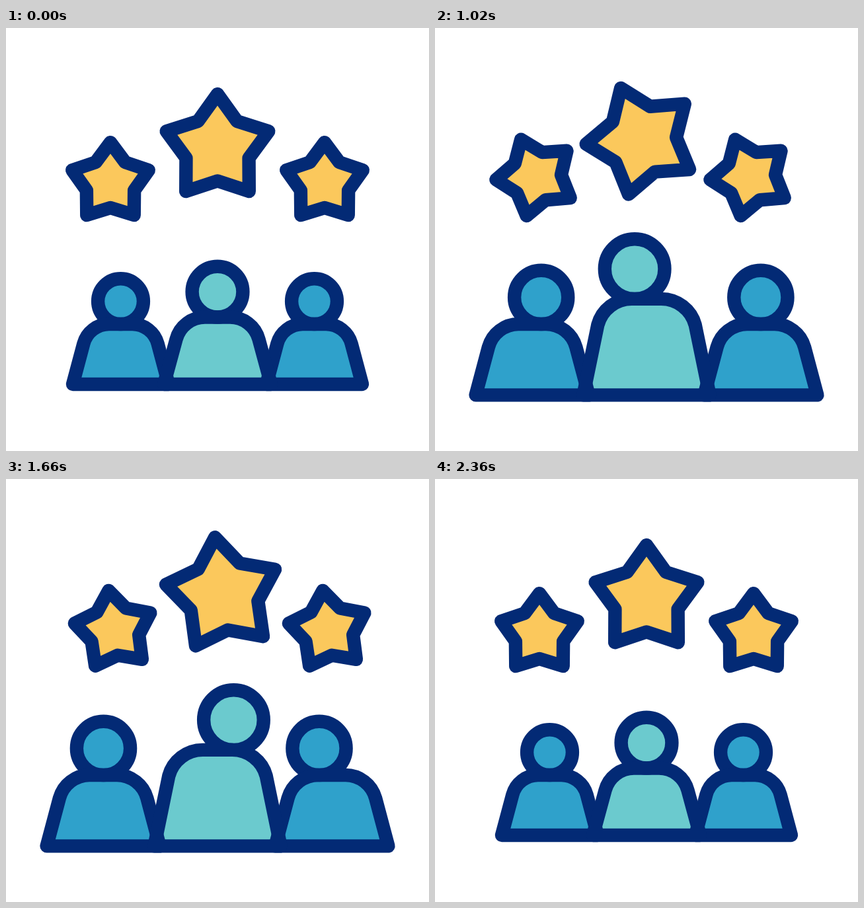
Animation, 640 px wide and 640 px high, one loop 2400 ms. Source, as an HTML page with a canvas:

```html
<!DOCTYPE html>
<html lang="en">
<head>
<meta charset="utf-8">
<title>Team rating</title>
<style>
html, body { margin: 0; width: 100%; height: 100%; overflow: hidden; background: #fff; }
canvas { display: block; width: 100vmin; height: 100vmin; }
</style>
</head>
<body>
<canvas id="stage" width="640" height="640"></canvas>
<script>
const ctx = document.getElementById('stage').getContext('2d');
const LOOP = 2400, RAD = Math.PI / 180;
const NAVY = '#032a75', GOLD = '#fbc85c', BLUE = '#2fa1cb', TEAL = '#6bcace';

// Smooth 0..1 progress between two times
function ease(t, from, to) {
  const u = Math.min(1, Math.max(0, (t - from) / (to - from)));
  return u * u * (3 - 2 * u);
}

function star(x, y, radius, inner, turn) {
  const lift = radius * 0.0955; // the pivot is the middle of the star's box
  ctx.save();
  ctx.translate(x, y);
  ctx.rotate(turn);
  ctx.beginPath();
  for (let i = 0; i < 10; i++) {
    const r = i % 2 ? inner : radius, a = i * 36 * RAD;
    ctx.lineTo(r * Math.sin(a), lift - r * Math.cos(a));
  }
  ctx.closePath();
  ctx.restore();
  ctx.fillStyle = GOLD;
  ctx.fill();
  ctx.stroke();
}

function headPath(p) {
  ctx.beginPath();
  ctx.arc(p.x + p.shift, p.top - p.head, p.head, 0, 2 * Math.PI);
}

function bodyPath(p) {
  const cy = p.top + p.round;
  ctx.beginPath();
  ctx.moveTo(p.x - p.half, 539);
  ctx.arc(p.x - p.flat, cy, p.round, 195 * RAD, 270 * RAD);
  ctx.arc(p.x + p.flat, cy, p.round, 270 * RAD, 345 * RAD);
  ctx.lineTo(p.x + p.half, 539);
  ctx.closePath();
}

// The path scales with the group, the line weight does not
function grouped(scale, path, person) {
  ctx.save();
  ctx.translate(320, 448);
  ctx.scale(scale, scale);
  ctx.translate(-320, -448);
  path(person);
  ctx.restore();
}

function people(t) {
  const grow = ease(t, 200, 700) - ease(t, 1700, 2200);
  const scale = 1 + 0.18 * grow;
  const first = ease(t, 700, 1200), second = ease(t, 1200, 1700);
  const back = ease(t, 1700, 2200), midBack = ease(t, 1700, 2250);
  const side = { top: 448, head: 34.4, half: 72.5, flat: 17.5, round: 40, color: BLUE };
  const crew = [
    { ...side, x: 173.5, shift: 16.3 * (first - second) },
    { ...side, x: 466.5, shift: -16.3 * (second - back) },
    { x: 320, top: 437.5 - 21.8 * grow, head: 38.4, half: 81, flat: 19, round: 45,
      color: TEAL, shift: 21.5 * (2 * second - first - midBack) }
  ];
  const paths = [headPath, bodyPath];
  for (const p of crew) for (const path of paths) {
    grouped(scale, path, p);
    ctx.fillStyle = p.color;
    ctx.fill();
  }
  for (const p of crew) for (const path of paths) {
    grouped(scale, path, p);
    ctx.stroke();
  }
}

function stars(t) {
  const turn = 2 * Math.PI * ease(t, 200, 2300);
  const swell = 1 + 0.08 * (ease(t, 200, 1800) - ease(t, 1800, 2400));
  star(158, 228.1, 60.8, 38, turn);
  star(482, 228.1, 60.8, 38, turn);
  star(320, 173.6, 81.3 * swell, 50 * swell, turn);
}

function draw(now) {
  const t = now % LOOP;
  ctx.fillStyle = '#fff';
  ctx.fillRect(0, 0, 640, 640);
  ctx.strokeStyle = NAVY;
  ctx.lineWidth = 20.4;
  ctx.lineJoin = 'round';
  people(t);
  stars(t);
}

let start = null;
function tick(now) {
  if (start === null) start = now;
  draw(now - start);
  requestAnimationFrame(tick);
}
draw(0);
requestAnimationFrame(tick);
</script>
</body>
</html>
```
